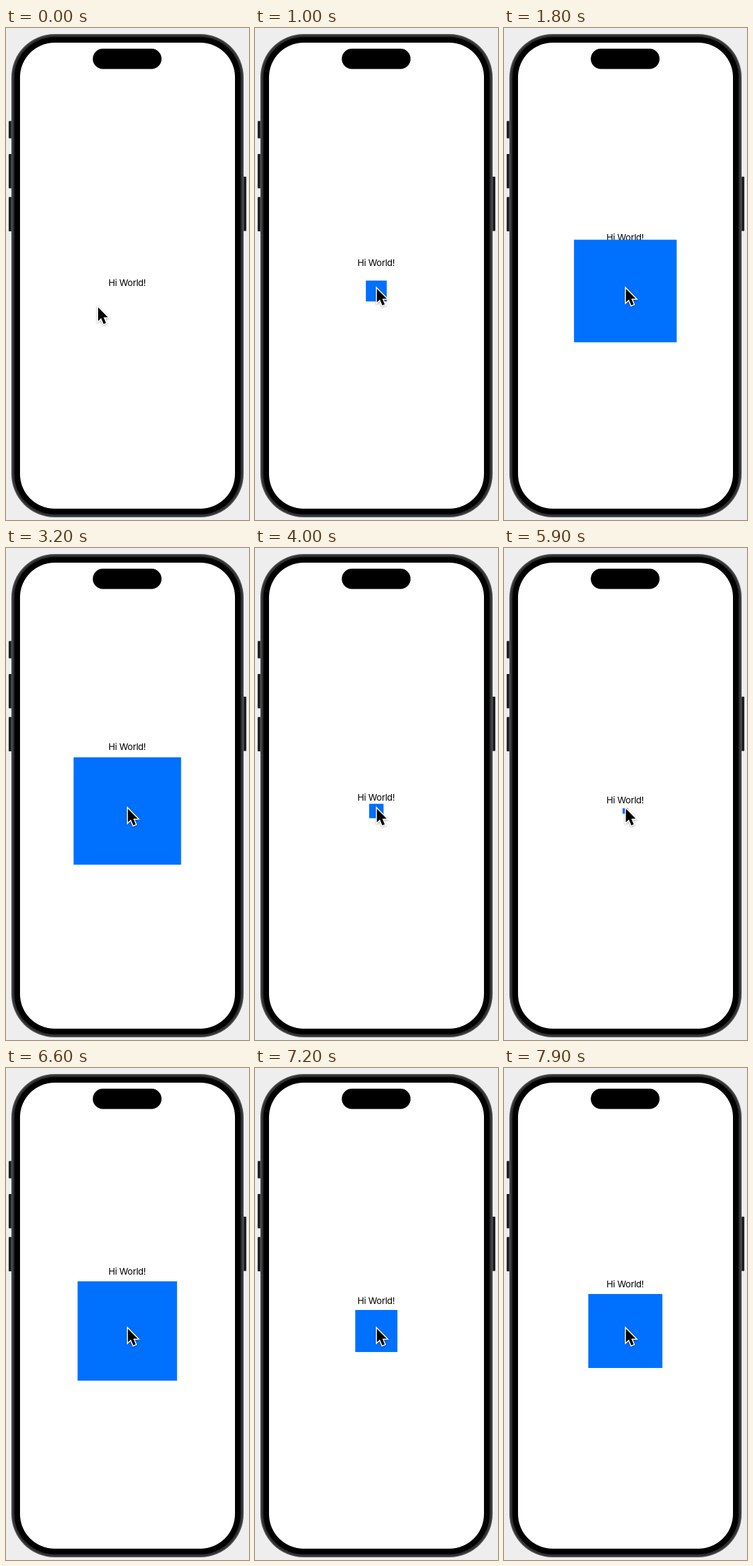
Animation of 364x738 px, one loop 8 s. Source, as an HTML page:

```html
<!DOCTYPE html>
<html lang="en">
<head>
<meta charset="utf-8">
<title>Hi World</title>
<style>
  html, body { margin: 0; width: 100%; height: 100%; overflow: hidden; background: #eee; }
  svg { display: block; }
  text { font: 13.5px Inter, "Open Sans", sans-serif; letter-spacing: -.3px; text-anchor: middle; }
  #cursor { filter: drop-shadow(0 1.5px 1.5px rgba(0, 0, 0, .35)); }
</style>
</head>
<body>
<svg width="364" height="738" viewBox="0 0 364 738">
  <g fill="#202123">
    <rect x="4" y="139.5" width="6" height="26" rx="1"/>
    <rect x="4" y="189" width="6" height="51.5" rx="1"/>
    <rect x="4" y="253.5" width="6" height="51.5" rx="1"/>
    <rect x="354" y="223" width="6" height="81.5" rx="1"/>
  </g>
  <rect x="8" y="9" width="348" height="725" rx="65" fill="#58595b"/>
  <rect x="9.5" y="10.5" width="345" height="722" rx="63.5" fill="#2f3032"/>
  <rect x="12.5" y="13.5" width="339" height="716" rx="60.5"/>
  <rect x="21" y="22" width="322" height="699" rx="52" fill="#fff"/>
  <rect x="130" y="31" width="103" height="30.5" rx="15.25"/>
  <text id="label" x="181.5" y="387">Hi World!</text>
  <rect id="square" fill="#0070ff"/>
  <path id="cursor" d="M0 0V20.5L4.5 16.3L8.2 25L11.8 23.5L8.2 15H14.8Z"
        stroke="#fff" stroke-width="3" paint-order="stroke"/>
</svg>
<script>
const LOOP = 8000, STEP = 100, SIZE = 164;
const $ = id => document.getElementById(id);

// Taps alternately open and close the square: [time, lead of the label] in ms
const taps = [[930, 40], [1765, 38], [2680, 40], [3690, 40], [4678, 43], [5485, 0], [6250, 0], [7018, 0], [7696, 0]];

// Cursor stops: [time, x, y]
const stops = [[0, 138, 419], [400, 337, 311], [800, 182.5, 391]];

// Critically damped spring, response 0.55 s
function spring(ms) {
  if (ms <= 0) return 0;
  const u = ms / 1000 * 2 * Math.PI / .55;
  return 1 - (1 + u) * Math.exp(-u);
}

const openness = (t, lead) =>
  taps.reduce((sum, [at, ahead], i) => sum + (i % 2 ? -1 : 1) * spring(t - at + lead * ahead), 0);

function cursorAt(t) {
  const i = stops.findIndex(s => s[0] > t);
  if (i < 0) return stops[stops.length - 1].slice(1);
  const [t0, x0, y0] = stops[i - 1], [t1, x1, y1] = stops[i];
  const p = (t - t0) / (t1 - t0), e = p * p * (3 - 2 * p);
  return [x0 + (x1 - x0) * e, y0 + (y1 - y0) * e];
}

function draw(now) {
  const t = Math.floor(now % LOOP / STEP) * STEP;
  const size = Math.max(0, SIZE * openness(t, 0));
  const square = $("square");
  square.setAttribute("x", 181.75 - size / 2);
  square.setAttribute("y", 394.5 - size / 2);
  square.setAttribute("width", size);
  square.setAttribute("height", size);
  $("label").setAttribute("y", 387 - 85 * openness(t, 1));
  $("cursor").setAttribute("transform", `translate(${cursorAt(t)})`);
}

const start = performance.now();
function tick() {
  draw(performance.now() - start);
  requestAnimationFrame(tick);
}
tick();
</script>
</body>
</html>
```
